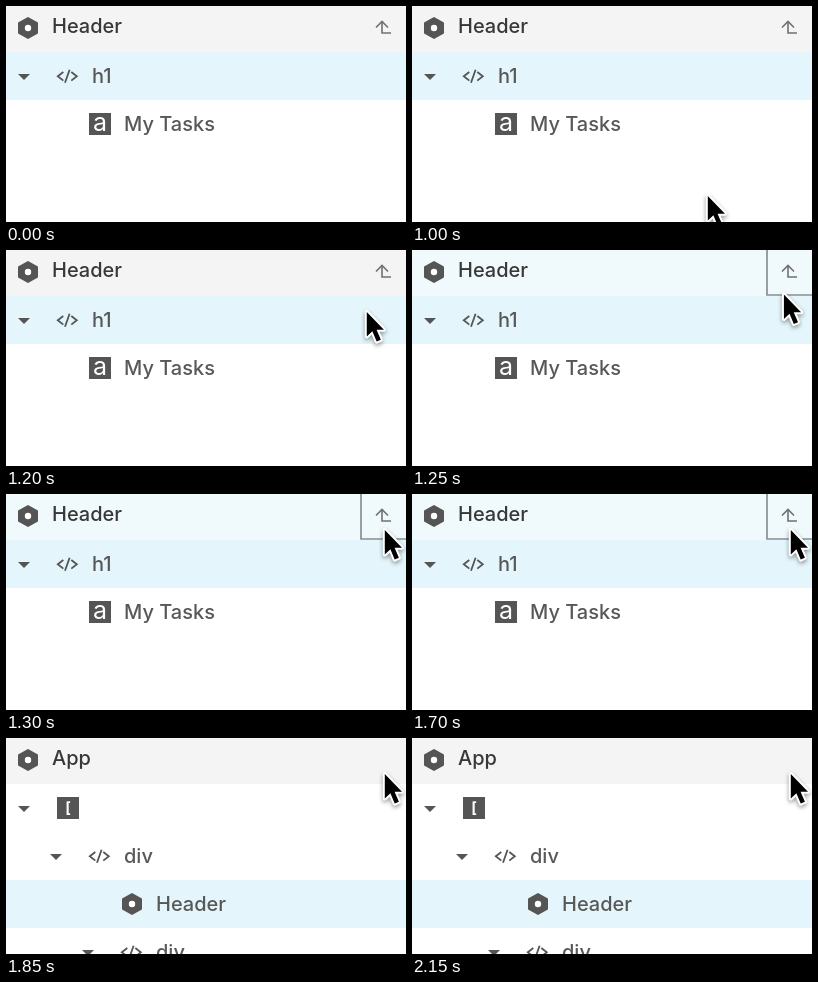
These frames come from a looping animation (400 by 216 pixels, 3.7 s). An HTML page with a canvas:

```html
<!DOCTYPE html>
<html lang="en">
<head>
<meta charset="utf-8">
<title>Component tree</title>
<style>
html, body { margin: 0; width: 100%; height: 100%; overflow: hidden; background: #fff; }
canvas { display: block; width: 400px; height: 216px; }
</style>
</head>
<body>
<canvas id="stage"></canvas>
<script>
const W = 400, H = 216, LOOP = 3700, STEP = 50;
const MOVE_START = 1000, MOVE_END = 1300, HOVER = 1250, CLICK = 1850;
const ICON = '#555', TITLE = '#383838', LABEL = '#585858';
const BAR = '#f4f4f4', BAR_HOVER = '#f0f9fc', SELECTED = '#e4f6fb';

const canvas = document.getElementById('stage');
const ctx = canvas.getContext('2d');
const scale = window.devicePixelRatio || 1;
canvas.width = W * scale;
canvas.height = H * scale;

function rect(x, y, w, h, color) {
  ctx.fillStyle = color;
  ctx.fillRect(x, y, w, h);
}

function path(points, closed) {
  ctx.beginPath();
  points.forEach(([x, y]) => ctx.lineTo(x, y));
  if (closed) ctx.closePath();
}

function line(points, width, color) {
  path(points);
  ctx.lineWidth = width;
  ctx.strokeStyle = color;
  ctx.stroke();
}

function text(str, x, y, color = LABEL, font = '500 20px', align = 'left') {
  ctx.font = font + ' Inter, sans-serif';
  ctx.textAlign = align;
  ctx.fillStyle = color;
  ctx.fillText(str, x, y);
}

function at(x, y, draw) {
  ctx.save();
  ctx.translate(x, y);
  draw();
  ctx.restore();
}

function hexagon(x, y) {
  at(x, y, () => {
    path([[0, -10], [9, -5], [9, 5], [0, 10], [-9, 5], [-9, -5]], true);
    ctx.fillStyle = ctx.strokeStyle = ICON;
    ctx.lineWidth = 2;
    ctx.lineJoin = 'round';
    ctx.fill();
    ctx.stroke();
    ctx.beginPath();
    ctx.arc(0, 0, 3.2, 0, Math.PI * 2);
    ctx.fillStyle = '#fff';
    ctx.fill();
  });
}

function caret(x, y) {
  at(x, y, () => {
    path([[-6, -2], [6, -2], [0, 4]], true);
    ctx.fillStyle = ICON;
    ctx.fill();
  });
}

function tagIcon(x, y) {
  at(x, y, () => {
    line([[-4, -4], [-9.5, 0.3], [-4, 4.6]], 1.8, ICON);
    line([[4, -4], [9.5, 0.3], [4, 4.6]], 1.8, ICON);
    line([[2.3, -6.2], [-2.3, 6.8]], 1.8, ICON);
  });
}

function badge(x, y, char, font, baseline) {
  rect(x - 11, y - 11, 22, 22, ICON);
  text(char, x, y + baseline, '#fff', font, 'center');
}

function upIcon() {
  line([[376, 16], [376, 27], [385, 27]], 1.6, '#707070');
  line([[370, 21.5], [376, 15.5], [382, 21.5]], 1.6, '#707070');
}

function tagRow(x, y, name) {
  caret(x, y);
  tagIcon(x + 43.3, y);
  text(name, x + 68, y + 7);
}

function title(name, bar) {
  rect(0, 0, W, 46, bar);
  hexagon(22, 22);
  text(name, 46, 27, TITLE);
}

function headerView(hover) {
  title('Header', hover ? BAR_HOVER : BAR);
  if (hover) line([[355, 0], [355, 45], [400, 45]], 1.7, '#8b8f90');
  upIcon();
  rect(0, 46, W, 48, SELECTED);
  tagRow(18, 70, 'h1');
  badge(94, 118, 'a', '400 25px', 7);
  text('My Tasks', 118, 125);
}

function appView() {
  title('App', BAR);
  caret(18, 70);
  badge(62, 70, '[', '700 15px', 5);
  tagRow(50, 118, 'div');
  rect(0, 142, W, 48, SELECTED);
  hexagon(126, 166);
  text('Header', 150, 173);
  tagRow(82, 214, 'div');
}

function pointer(t) {
  const p = Math.min(1, (t - MOVE_START) / (MOVE_END - MOVE_START));
  const x = 378.8 - 83 * Math.pow(1 - p, 1.39);
  const y = 36 + 154 * Math.pow(1 - p, 1.62);
  at(x, y, () => {
    path([[0, 0], [0, 24.5], [5.6, 19.3], [9.9, 29.6], [14.1, 27.7], [9.8, 17.7], [17.2, 17.7]], true);
    ctx.lineJoin = 'round';
    ctx.lineWidth = 4;
    ctx.strokeStyle = '#fff';
    ctx.shadowColor = 'rgba(0,0,0,.4)';
    ctx.shadowBlur = 4 * scale;
    ctx.shadowOffsetY = 2 * scale;
    ctx.stroke();
    ctx.shadowColor = 'transparent';
    ctx.fillStyle = '#000';
    ctx.fill();
  });
}

function draw(now) {
  const t = Math.floor((now % LOOP) / STEP) * STEP;
  ctx.setTransform(scale, 0, 0, scale, 0, 0);
  rect(0, 0, W, H, '#fff');
  if (t < CLICK) headerView(t >= HOVER);
  else appView();
  if (t >= MOVE_START) pointer(t);
}

const start = performance.now();
function tick() {
  draw(performance.now() - start);
  requestAnimationFrame(tick);
}
tick();
</script>
</body>
</html>
```
